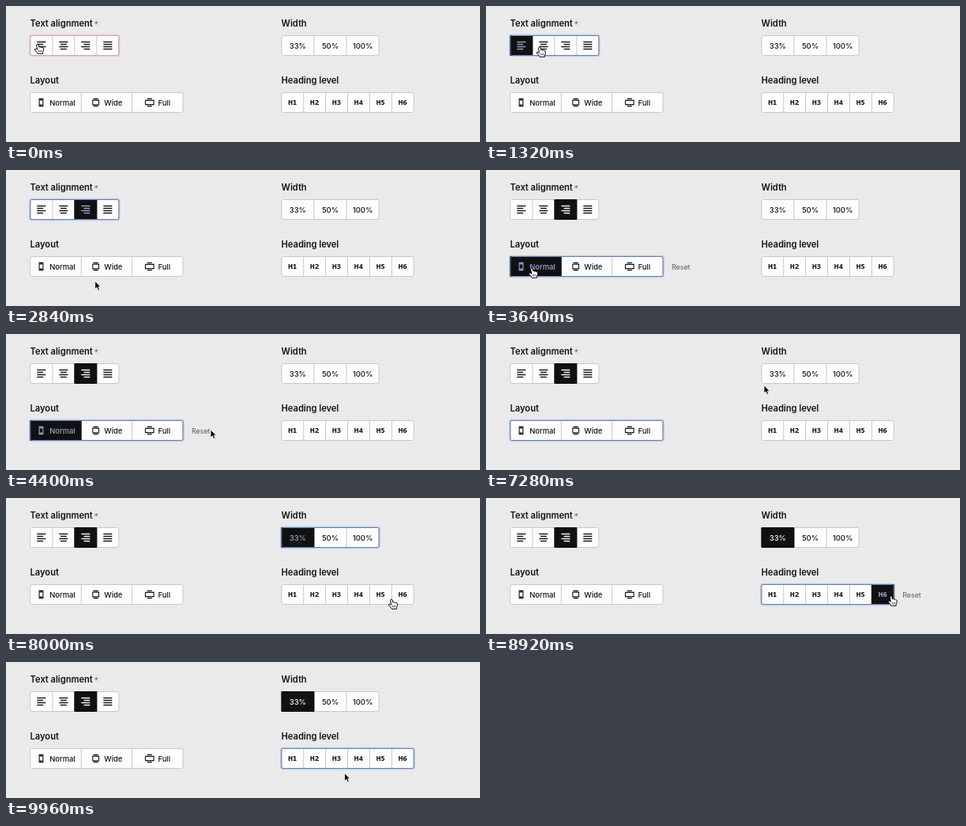
Recreate the animation shown at these times as an HTML page. Size 600 by 172 pixels, loop 10000 ms.

```html
<!DOCTYPE html>
<html lang="en">
<head>
<meta charset="utf-8">
<title>Toggle fields</title>
<style>
html, body { margin: 0; width: 100%; height: 100%; overflow: hidden; background: #ebeaeb; }
svg { display: block; width: 600px; height: 172px; font-family: Inter, sans-serif; }
.label { font-size: 11.1px; font-weight: 600; fill: #111; }
.text { font-size: 9.4px; font-weight: 450; }
.level { font: 700 9.3px "Noto Sans Mono", monospace; }
.reset { font-size: 8.9px; }
</style>
</head>
<body>
<svg id="stage" viewBox="0 0 600 172"></svg>
<script>
const LOOP = 10000, ROW = 25, TRAVEL = 360, DWELL = 320;
const stage = document.getElementById('stage');

const set = (el, attrs) => { for (const k in attrs) el.setAttribute(k, attrs[k]); };

function add(parent, tag, attrs, text) {
  const el = document.createElementNS('http://www.w3.org/2000/svg', tag);
  set(el, attrs);
  if (text) el.textContent = text;
  parent.appendChild(el);
  return el;
}

const caption = (g, x, y, text, cls, anchor = 'middle') =>
  add(g, 'text', { x, y, class: cls, 'text-anchor': anchor, fill: 'currentColor' }, text);

function alignItem(g, kind, cx, cy) {
  const full = 11;
  for (let i = 0; i < 4; i++) {
    const w = i % 2 && kind !== 'justify' ? 7.8 : full;
    const shift = kind === 'center' ? .5 : kind === 'right' ? 1 : 0;
    add(g, 'rect', { x: cx - full / 2 + (full - w) * shift, y: cy - 5.2 + i * 3,
      width: w, height: 1.4, fill: 'currentColor' });
  }
}

// Icon and name, centred together; each icon is wider and flatter than the last.
function layoutItem(g, name, cx, cy, i) {
  const text = caption(g, 0, cy + 3.5, name, 'text', 'start');
  const left = cx - (16.9 + text.getComputedTextLength()) / 2, icon = left + 6.2;
  const w = 4.8 + 2.9 * i, h = 6.2 - .5 * i;
  set(text, { x: left + 16.9 });
  add(g, 'path', {
    d: `M${icon - w / 2} ${cy - h / 2}h${w}v${h}h${-w}zM${icon - 3} ${cy - 4.6}h6m0 9.2h-6`,
    fill: 'none', stroke: 'currentColor', 'stroke-width': 1.1
  });
}

const widthItem = (g, name, cx, cy) => caption(g, cx, cy + 3.5, name, 'text');
const levelItem = (g, name, cx, cy) => caption(g, cx, cy + 3.4, name, 'level');

function makeField(title, x, y, w, names, drawItem, clearable) {
  add(stage, 'text', { x: x - .2, y: y - 11.5, class: 'label' }, title);
  const width = w * names.length, right = x + width;
  const box = { x, y, width, height: ROW, rx: 2 };
  const glow = add(stage, 'rect', { ...box, fill: 'none', 'stroke-width': 3.6 });
  add(stage, 'rect', { ...box, fill: '#fdfdfd', stroke: '#c6c6c6' });
  for (let i = 1; i < names.length; i++)
    add(stage, 'path', { d: `M${x + i * w} ${y}v${ROW}`, stroke: '#c9c9c9' });
  const items = names.map((name, i) => {
    const g = add(stage, 'g', {});
    const bg = add(g, 'rect', { x: x + i * w - .5, y: y - .5, width: w + 1, height: ROW + 1, rx: 1, fill: '#111' });
    drawItem(g, name, x + (i + .5) * w, y + ROW / 2, i);
    return { g, bg };
  });
  const ring = add(stage, 'rect', { ...box, fill: 'none' });
  const reset = clearable && add(stage, 'text', { x: right + 11, y: y + 16.4, class: 'reset' }, 'Reset');
  return { x, y, w, right, glow, ring, items, reset };
}

const fields = [
  makeField('Text alignment', 30.8, 37.5, 28, ['left', 'center', 'right', 'justify'], alignItem),
  makeField('Layout', 30.8, 109.5, 64.4, ['Normal', 'Wide', 'Full'], layoutItem, true),
  makeField('Width', 348.8, 37.5, 41.1, ['33%', '50%', '100%'], widthItem),
  makeField('Heading level', 348.8, 109.5, 27.9, ['H1', 'H2', 'H3', 'H4', 'H5', 'H6'], levelItem, true)
];
const [align, layout, width, heading] = fields;
add(stage, 'text', { x: 111.5, y: 27, 'font-size': 11, fill: '#777' }, '*');

const arrow = add(stage, 'path', {
  d: 'M0 0V10L2.3 7.9L4 11.7L5.8 10.9L4.1 7.2H7.2Z',
  fill: '#000', stroke: '#fff', 'stroke-width': .8, 'stroke-linejoin': 'round'
});
const hand = add(stage, 'g', {});
add(hand, 'path', {
  d: 'M-1.3 .8Q-.2 -.7 1 .8L1.7 3.6Q2.8 2.8 3.5 3.9Q4.6 3.1 5.3 4.4Q6.6 4 6.9 5.4' +
     'Q7.3 8 6 9.8V11.4H.3Q-.7 9.4 -3 7.4Q-4 6 -2.6 5.6Q-1.6 5.6 -.4 6.8Z',
  fill: '#fff', stroke: '#000', 'stroke-width': .9, 'stroke-linejoin': 'round'
});
add(hand, 'path', { d: 'M1.4 7.2V9.6M3 7.2V9.6M4.6 7.2V9.6', stroke: '#000', 'stroke-width': .6 });

// The pointer reaches a button, or Reset for item -1, and dwells before clicking.
function click(at, field, item) {
  const cx = item < 0 ? field.right + 23 : field.x + (item + .5) * field.w;
  return { at, arrive: at - DWELL, x: cx - 5, y: field.y + 14.5, field, item };
}
const rest = (at, x, y) => ({ at, arrive: at, x, y });

const acts = [
  rest(0, 40, 48),
  rest(320, 24, 30),
  click(880, align, 0),
  click(1560, align, 1),
  click(2080, align, 2),
  rest(2840, 112.7, 140.6),
  click(3480, layout, 0),
  rest(4400, 259, 121),
  click(5120, layout, 1),
  click(5640, layout, 2),
  click(6240, layout, -1),
  rest(6600, 250, 135),
  rest(7280, 352, 65),
  click(7680, width, 0),
  rest(8000, 488, 128),
  click(8760, heading, 5),
  click(9440, heading, -1),
  rest(9960, 428.5, 140.5)
];

function pointerAt(t) {
  let { x, y } = acts[0];
  for (let i = 1; i < acts.length; i++) {
    const a = acts[i], start = Math.max(acts[i - 1].at, a.arrive - TRAVEL);
    if (t <= start) break;
    const u = Math.min(1, (t - start) / (a.arrive - start)), e = u * u * (3 - 2 * u);
    x += (a.x - x) * e;
    y += (a.y - y) * e;
  }
  return [x, y];
}

function render(t) {
  const chosen = new Map();
  let focus = null;
  for (const a of acts) {
    if (!a.field || a.at > t) continue;
    chosen.set(a.field, a.item);
    focus = a.field;
  }
  const [x, y] = pointerAt(t);
  let over = false;

  for (const f of fields) {
    const pick = chosen.has(f) ? chosen.get(f) : -1;
    const focused = focus === f, invalid = f === align && !focus;
    const inRow = y > f.y && y < f.y + ROW;
    over = over || (inRow && x > f.x && x < f.right);
    set(f.glow, { stroke: focused ? '#c0cade' : invalid ? '#e3d2d1' : 'none' });
    set(f.ring, { stroke: focused ? '#5f80bd' : invalid ? '#cbacaa' : 'none' });
    f.items.forEach((item, n) => {
      const on = pick === n;
      item.bg.style.display = on ? '' : 'none';
      item.g.style.color = !on ? '#111' : focused ? '#8fabd8' : '#fff';
    });
    if (f.reset) {
      const shown = pick >= 0;
      const hot = shown && inRow && x > f.right + 10 && x < f.right + 34.5;
      over = over || hot;
      f.reset.style.display = shown ? '' : 'none';
      set(f.reset, { fill: hot ? '#111' : '#5c5c5c' });
    }
  }

  const place = `translate(${x.toFixed(2)} ${y.toFixed(2)})`;
  set(arrow, { transform: place, visibility: over ? 'hidden' : 'visible' });
  set(hand, { transform: place + ' scale(1.08)', visibility: over ? 'visible' : 'hidden' });
}

function tick() {
  render(Math.floor(performance.now() % LOOP / 40) * 40);
  requestAnimationFrame(tick);
}
tick();
</script>
</body>
</html>
```
